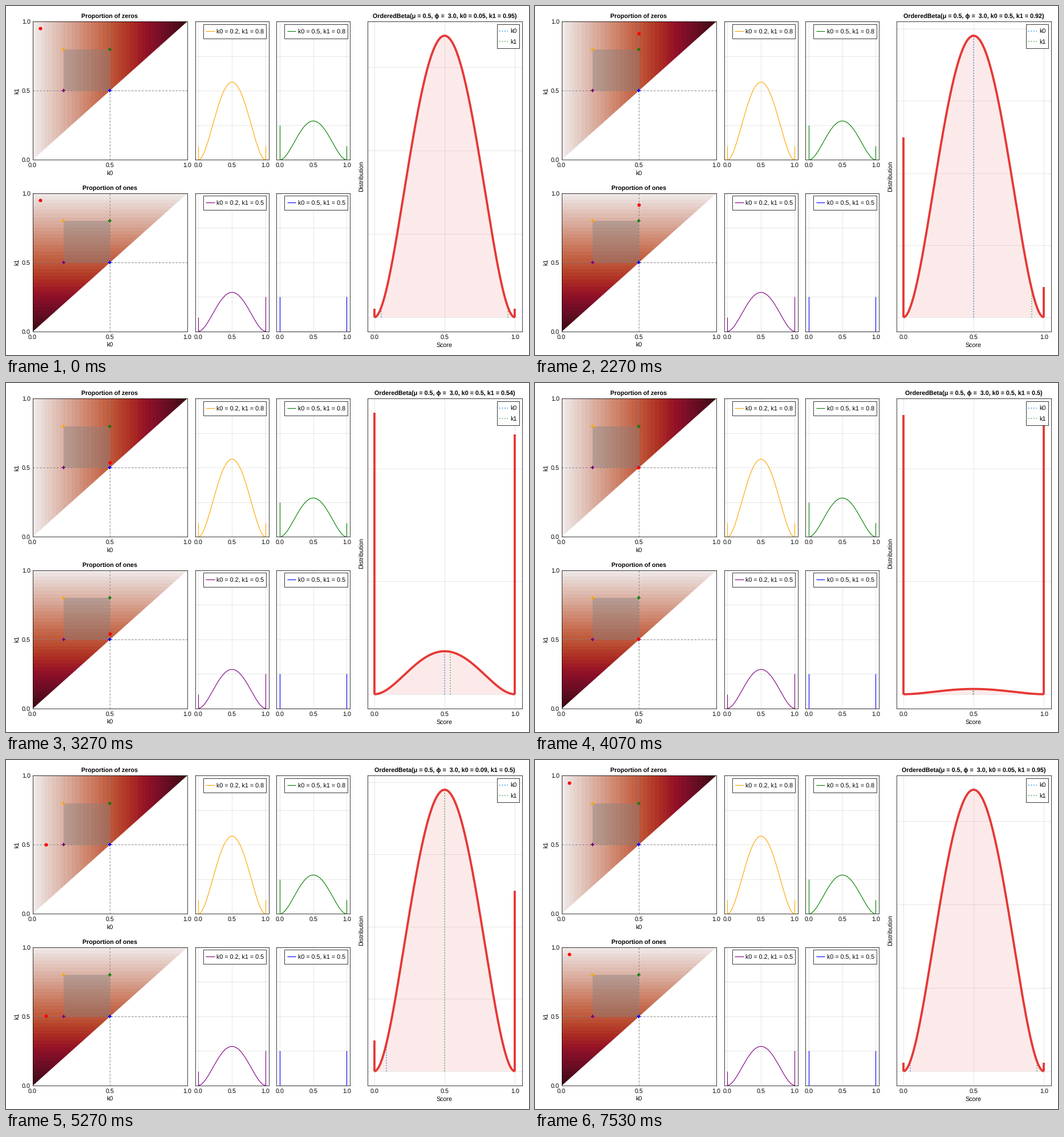
A matplotlib script for the animation above (7990 ms loop, 917 px wide and 611 px high).

```python
import matplotlib.pyplot as plt
import numpy as np
from matplotlib.animation import FuncAnimation
from matplotlib.colors import LinearSegmentedColormap
from matplotlib.patches import Polygon, Rectangle

W, H, DPI = 917, 611, 64
PT = 72 / DPI            # points per pixel
UNIT = W / 1200          # layout unit in pixels
FRAMES, LOOP_MS = 120, 7990
PHASE, MOVING = 30, 24   # steps per phase, of which the point moves
LOW, MID, HIGH = 0.05, 0.5, 0.95
RED, BLUE, GREEN = "#E53935", "#1E88E5", "#43A047"

plt.rcParams.update({
    "font.family": ["Liberation Sans", "DejaVu Sans"],
    "font.size": 14 * UNIT * PT,
    "text.hinting": "none",
    "axes.linewidth": UNIT * PT,
    "axes.axisbelow": True,
    "grid.color": (0, 0, 0, 0.12),
    "grid.linewidth": UNIT * PT,
    "lines.solid_capstyle": "butt",
})

AMP = LinearSegmentedColormap.from_list("amp", np.array([
    (241, 236, 236), (230, 209, 203), (221, 182, 170), (213, 156, 137),
    (205, 129, 103), (196, 102, 73), (186, 74, 47), (172, 44, 36),
    (149, 19, 39), (120, 14, 40), (89, 13, 31), (60, 9, 17)]) / 255)

CASES = [(0.2, 0.8, "orange"), (0.5, 0.8, "green"),
         (0.2, 0.5, "purple"), (0.5, 0.5, "blue")]
ROWS = [(27.4, 269.4), (327.5, 569.5)]
COLS = [(331.5, 461), (474.4, 603.3)]

X = np.linspace(0, 1, 201)
BETA = 30 * X**2 * (1 - X)**2

fig = plt.figure(figsize=(W / DPI, H / DPI), dpi=DPI, facecolor="white")
page = fig.add_axes([0, 0, 1, 1], zorder=10)
page.set(xlim=(0, W), ylim=(H, 0))
page.axis("off")


def panel(x0, x1, y0, y1, margin=0.0):
    ax = fig.add_axes([x0 / W, 1 - y1 / H, (x1 - x0) / W, (y1 - y0) / H])
    ax.set_xlim(-margin, 1 + margin)
    ax.set_xticks([0, 0.5, 1])
    ax.tick_params(length=0)
    ax.tick_params(axis="x", pad=5 * PT)
    ax.tick_params(axis="y", pad=3.6 * PT)
    ax.grid(True)
    return ax


def write(x, y, text, **kw):
    return page.text(x, y, text, **{"ha": "center", "va": "baseline", **kw})


def legend(x0, x1, top, entries, width, style="-"):
    pad, patch, gap = 6 * UNIT, 20 * UNIT, 3 * UNIT
    n = len(entries)
    height = 2 * pad + n * patch + (n - 1) * gap
    page.add_patch(Rectangle((x0, top), x1 - x0, height, fc="white",
                             ec="black", lw=UNIT * PT, zorder=1))
    for i, (text, color) in enumerate(entries):
        y = top + pad + patch / 2 + i * (patch + gap)
        left = x0 + pad
        page.plot([left, left + patch], [y, y], ls=style, color=color,
                  lw=width * UNIT * PT)
        write(left + patch + 5 * UNIT, y + 3.8, text, ha="left")


def heat_panel(y0, y1, heading, values):
    ax = panel(46.5, 317.5, y0, y1)
    image = ax.imshow(values, cmap=AMP, vmin=0, vmax=1, origin="lower",
                      extent=(0, 1, 0, 1), aspect="auto",
                      interpolation="nearest", zorder=1)
    image.set_clip_path(Polygon([(0, 0), (0, 1), (1, 1)],
                                transform=ax.transData))
    ax.set(xlim=(0, 1), ylim=(0, 1), yticks=[0, 0.5, 1])
    ax.add_patch(Rectangle((0.2, 0.5), 0.3, 0.3, fc="gray", alpha=0.4,
                           lw=0, zorder=1.5))
    dash = dict(color="gray", lw=1.3 * UNIT * PT, ls=(0, (3, 3)))
    ax.axvline(0.5, **dash)
    ax.axhline(0.5, **dash)
    for k0, k1, color in CASES:
        ax.plot([k0], [k1], "+", color=color, ms=6 * PT, mew=2 * PT, zorder=3)
    write(182, y0 - 5.2, heading, weight="bold")
    write(182, y1 + 27.5, "k0")
    write(19.6, (y0 + y1) / 2, "k1", rotation=90, va="center")
    return ax.plot([], [], "o", color="red", ms=6 * PT, mew=0, zorder=4)[0]


def case_panel(x0, x1, y0, y1, k0, k1, color):
    ax = panel(x0, x1, y0, y1, 0.05)
    ax.set(ylim=(0, 2), yticks=[0, 0.5, 1, 1.5, 2])
    ax.tick_params(labelleft=False)
    style = dict(color=color, lw=1.5 * UNIT * PT)
    ax.plot(X, (k1 - k0) * BETA, **style)
    ax.plot([0, 0], [0, k0], **style)
    ax.plot([1, 1], [0, 1 - k1], **style)
    legend(x1 - 115.3, x1 - 4.6, y0 + 4.7,
           [(f"k0 = {k0}, k1 = {k1}", color)], 1.5)


def nice_ticks(top):
    """Wilkinson-style ticks for an axis from 0 to top with 5 % margins."""
    span, best, ticks = 1.1 * top, -np.inf, [0]
    for power in (1, 0.1, 0.01):
        for q, nice in ((1, 1), (5, 0.9), (2, 0.7), (2.5, 0.5), (3, 0.2)):
            step = q * power
            n = int(1.05 * top / step + 1e-9) + 1
            if not 3 <= n <= 10:
                continue
            grain = max(0, 1 - abs(n - 5) / 5)
            cover = 1.5 * span / ((n - 1) * step)
            score = grain / 4 + cover / 3 + nice / 4
            if score > best + 1e-9:
                best, ticks = score, step * np.arange(n)
    return ticks


def glide(i, phase, start, end):
    i = min(i, phase * PHASE + MOVING - 1)
    u = (i / (FRAMES - 1) - phase / 4) / 0.2
    return float(start + (end - start) * (1 - np.cos(np.pi * u)) / 2)


def cutpoints(i):
    k0 = glide(i, 0, LOW, MID) if i < 60 else glide(i, 2, MID, LOW)
    if i < 30:
        k1 = HIGH
    else:
        k1 = glide(i, 1, HIGH, MID) if i < 90 else glide(i, 3, MID, HIGH)
    return k0, k1


levels = (np.arange(40) + 0.5) / 40
dots = [heat_panel(*ROWS[0], "Proportion of zeros", levels[None, :]),
        heat_panel(*ROWS[1], "Proportion of ones", 1 - levels[:, None])]
for j, case in enumerate(CASES):
    case_panel(*COLS[j % 2], *ROWS[j // 2], *case)

main = panel(633.5, 904.6, 27.4, 569.5, 0.05)
main.tick_params(labelleft=False)
bold = dict(color=RED, lw=5 * UNIT * PT, zorder=3)
dotted = dict(lw=2 * UNIT * PT, ls=(0, (1, 2)), zorder=2.2)
area = main.fill(X, BETA, color=RED, alpha=0.1, lw=0)[0]
mark0, = main.plot([], [], color=BLUE, **dotted)
mark1, = main.plot([], [], color=GREEN, **dotted)
curve, = main.plot([], [], **bold)
stem0, = main.plot([], [], **bold)
stem1, = main.plot([], [], **bold)
legend(860.6, 900.1, 32.1, [("k0", BLUE), ("k1", GREEN)], 2, (0, (1, 2)))
title = write(769, 22.2, "", weight="bold")
write(769, 597, "Score")
write(624, 298.5, "Distribution", rotation=90, va="center")


def update(i):
    k0, k1 = cutpoints(i)
    density = (k1 - k0) * BETA
    for dot in dots:
        dot.set_data([k0], [k1])
    curve.set_data(X, density)
    area.set_xy(np.column_stack([X, density]))
    stem0.set_data([0, 0], [0, k0])
    stem1.set_data([1, 1], [0, 1 - k1])
    for mark, k in ((mark0, k0), (mark1, k1)):
        mark.set_data([k, k], [0, np.interp(k, X, density)])
    top = max(density.max(), k0, 1 - k1)
    main.set_yticks(nice_ticks(top))
    main.set_ylim(-0.05 * top, 1.05 * top)
    title.set_text("OrderedBeta(μ = 0.5, ϕ =  3.0, "
                   f"k0 = {round(k0, 2)}, k1 = {round(k1, 2)})")
    return [*dots, curve, area, stem0, stem1, mark0, mark1, title]


anim = FuncAnimation(fig, update, frames=FRAMES, interval=LOOP_MS / FRAMES,
                     repeat=True, repeat_delay=0, blit=False)
plt.show()
```
